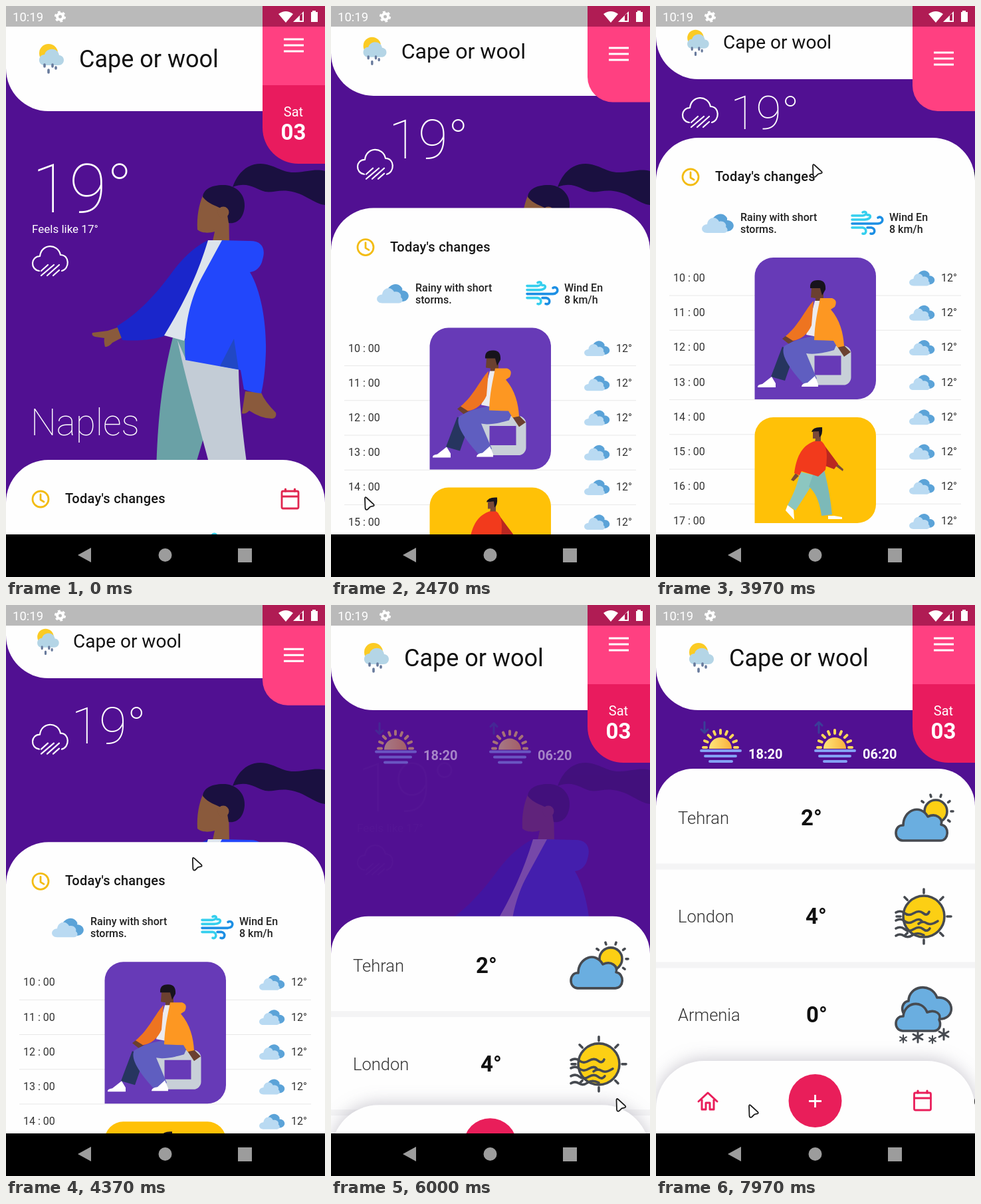
An HTML page for the animation above (8000 ms loop, 480 by 858 pixels).

```html
<!DOCTYPE html>
<html lang="en">
<head>
<meta charset="utf-8">
<title>Weather app</title>
<style>
html, body { margin: 0; width: 100%; height: 100%; overflow: hidden; background: #000; }
svg { display: block; width: 100%; height: 100%; }
text { font-family: Roboto, sans-serif; }
.paper { fill: #fefefe; }
.line { fill: none; stroke-linecap: round; stroke-linejoin: round; }
.ink { stroke: #464a50; stroke-width: 3.6; stroke-linecap: round; stroke-linejoin: round; }
#dock { filter: drop-shadow(0 -2px 13px rgba(70, 60, 90, .28)); }
</style>
</head>
<body>
<svg id="stage" viewBox="0 0 480 858">
  <defs>
    <g id="cloud">
      <path fill="#5ba3d8" d="M14 14C17 2 30-3 37 6Q39 8 38 11C47 11 51 20 45 25Q41 29 30 27Z"/>
      <path fill="#b9daf2" d="M8 30C-2 30-3 18 8 17C9 6 22 4 26 13C33 11 38 17 36 21C41 25 38 30 33 30Z"/>
    </g>
    <g id="calendar" class="line" stroke-width="2.8">
      <rect x="-12.500" y="-12" width="25" height="26" rx="2"/>
      <path d="M-12-4H12M-7-15V-12M7-15V-12" stroke-width="3.2"/>
    </g>
    <linearGradient id="sunset" x2="1"><stop stop-color="#ffe67a"/><stop offset="1" stop-color="#f9b03c"/></linearGradient>
    <g id="sun">
      <path fill="url(#sunset)" d="M-17 0A17 17 0 0 1 17 0Z"/>
      <path id="halfRays" class="line" stroke="#ffd75a" stroke-width="4"/>
      <path class="line" stroke="#84a0f4" stroke-width="4" d="M-29 3H30M-23 11H23M-16 19H17"/>
    </g>
    <path id="flake" class="ink" d="M0-8V8M-7-4L7 4M7-4L-7 4" style="stroke-width:3"/>
  </defs>

  <rect width="480" height="858" fill="#511092"/>

  <g id="woman">
    <path fill="#1a1040" d="M341 272C350 247 366 237 383 237C405 238 415 251 435 250C455 249 465 244 480 248V299C462 297 450 281 425 278C410 276 400 281 390 279C375 275 364 263 341 272Z"/>
    <path fill="#8a5a3c" d="M296 285C290 300 287 316 288 336C293 341 304 342 314 339L311 353L336 358L335 300Z"/>
    <path fill="#1a1040" d="M296 287C297 274 312 268 330 269C350 271 360 286 359 301C358 318 348 328 335 326L332 308L321 303C316 300 305 298 296 287Z"/>
    <circle cx="327" cy="310" r="8.500" fill="#8a5a3c"/>
    <path fill="#8a5a3c" d="M168 483L153 488L130 491Q128 495 134 497L148 499Q147 505 149 512Q154 513 160 506L175 498ZM360 579L384 581Q389 594 406 611Q408 619 400 620Q384 620 366 608Q360 614 355 612Z"/>
    <path fill="#6aa1a6" d="M251 498C235 560 228 620 226 700H282L300 640L270 502Z"/>
    <path fill="#c3ccd6" d="M258 502L270 530L350 545C351 600 356 640 364 700H309C288 620 270 560 258 502Z"/>
    <path fill="#1a26cb" d="M304 352C285 361 268 376 250 400C225 435 195 465 167 481L175 502C200 504 225 501 240 495C270 460 292 410 304 352Z"/>
    <path fill="#dde4ec" d="M304 352H326L300 430L268 503L238 495C262 455 285 415 304 352Z"/>
    <path fill="#2247fb" d="M325 352L365 353C386 352 391 365 386 381C384 392 376 399 367 400C385 430 392 480 391 520C390 550 387 570 384 582Q370 581 358 576L353 547L270 532C266 493 275 443 295 407C305 389 315 370 325 352Z"/>
    <path fill="#2148c4" d="M343 500L350 546L322 541Z"/>
  </g>

  <g id="hero" fill="#fff">
    <g id="temp"><text x="-6" font-size="102.500" font-weight="100">19°</text></g>
    <g id="heroExtra">
      <text x="39" y="341" font-size="17">Feels like 17°</text>
      <text x="37" y="645" font-size="54.800" font-weight="200">Naples</text>
    </g>
    <g id="rain" class="line" stroke="#fff" stroke-width="2.2">
      <path d="M50 398C36 396 37 376 51 376C53 357 78 356 82 374C96 374 96 395 84 398"/>
      <path d="M63 389L53 398M72 389L53 405M80 389L62 405M80 397L71 405"/>
    </g>
  </g>

  <g id="suns">
    <use href="#sun" x="97" y="216"/><use href="#sun" x="269" y="216"/>
    <path class="line" stroke="#3a3f98" stroke-width="3" d="M73 176V191M68 187L73 192L78 187M245 192V177M240 181L245 176L250 181"/>
    <g fill="#fff" font-size="20" font-weight="700"><text x="139" y="231">18:20</text><text x="311" y="231">06:20</text></g>
  </g>

  <g id="sheet">
    <path class="paper" d="M0 1000V262A64 64 0 0 1 64 198H416A64 64 0 0 1 480 262V1000Z"/>
    <g class="line" stroke="#f3bc13" stroke-width="2.8"><circle cx="52" cy="257" r="12"/><path d="M52 250V258L57 261"/></g>
    <text x="89" y="263" font-size="20" font-weight="500" letter-spacing=".25" fill="#161616">Today's changes</text>
    <use id="sheetCalendar" href="#calendar" x="427.500" y="257" stroke="#e0264f"/>
    <use href="#cloud" x="69" y="311"/>
    <g class="line" stroke-width="3.6">
      <path stroke="#35cfee" d="M295 315H311C319 314 317 307 311 310M295 321H314C325 320 324 313 318 314M295 333H311C318 334 317 344 311 342"/>
      <path stroke="#1c8fe4" d="M295 327H334C345 326 341 314 334 318M318 333H324C331 334 330 344 323 342"/>
    </g>
    <g font-size="16" font-weight="500" fill="#222">
      <text x="127" y="323">Rainy with short</text><text x="127" y="341">storms.</text>
      <text x="351" y="323">Wind En</text><text x="351" y="341">8 km/h</text>
    </g>
    <g id="hours"></g>

    <path fill="#673ab7" d="M148.500 591V406A28 28 0 0 1 176.500 378H303A28 28 0 0 1 331 406V563A28 28 0 0 1 303 591Z"/>
    <rect x="231" y="518" width="55" height="44" rx="4" fill="none" stroke="#c8d0d8" stroke-width="15"/>
    <path fill="#6b4030" d="M234 423L233 438L240 439V447H252V420ZM195 496L190 500L200 508L209 502ZM273 512L283 527L293 520L282 509Z"/>
    <path fill="#17131c" d="M232 424Q231 412 243 412Q256 411 255 426L250 435L247 424Z"/>
    <path fill="#26355f" d="M190 512L209 520L194 563L173 557Z"/>
    <path fill="#5f5ec0" d="M238 496L274 503L268 517Q240 525 226 522L242 560L223 569C204 548 186 525 193 511Q210 500 238 496Z"/>
    <path fill="#ecebef" d="M239 443H250L242 497L226 494Z"/>
    <path fill="#ee7420" d="M237 443C225 455 215 480 195 496L206 503Q225 500 234 480Z"/>
    <path fill="#fd9722" d="M247 439H265Q274 442 269 452L263 456C277 472 282 492 283 511L273 513L267 503L238 502C239 475 243 460 247 439Z"/>
    <path fill="#fff" d="M174 557L180 567V573H153Q152 569 160 568ZM239 556L244 568V572H219Q219 567 228 566Z"/>

    <path fill="#ffc107" d="M148.500 777V646A28 28 0 0 1 176.500 618H303A28 28 0 0 1 331 646V749A28 28 0 0 1 303 777Z"/>
    <path fill="#7b4a38" d="M236 640V650H240L239 656H248V638ZM210 702L203 712L207 714L215 706ZM270 691L281 699L282 696L272 687Z"/>
    <path fill="#17131c" d="M234 640Q236 632 250 633Q251 645 246 648L245 639Z"/>
    <path fill="#8cc6c0" d="M217 700L243 706Q225 735 210 758L198 750C208 732 213 717 217 700Z"/>
    <path fill="#7cb9b8" d="M237 702L253 697Q262 733 265 764L249 766Q245 735 230 722Z"/>
    <path fill="#ba2720" d="M251 657Q262 672 274 688L268 696L252 690Z"/>
    <path fill="#f23a1c" d="M238 654H249Q261 664 255 697L244 707L219 699L216 705L208 702C211 680 218 661 238 654Z"/>
    <path fill="#fff" d="M198 750L207 757L208 772L195 758ZM259 766H268L280 768V771H259Z"/>
  </g>

  <g id="list">
    <path class="paper" d="M0 1300V302A56 56 0 0 1 56 246H424A56 56 0 0 1 480 302V1300Z"/>
    <path stroke="#f4f4f5" stroke-width="9" d="M0 393H480M0 541H480"/>
    <g id="cities"></g>
    <path class="ink rays" data-ring="421 310 23 26 10"/>
    <circle class="ink" cx="421" cy="310" r="17" fill="#fccf14"/>
    <path class="ink" fill="#6aaee0" d="M371 354C357 353 358 330 372 331C372 308 398 298 409 318C422 312 432 321 429 330C442 332 441 354 428 354Z"/>
    <path class="ink rays" data-ring="403 468 35 41 8"/>
    <circle class="ink" cx="403" cy="468" r="31" fill="#fccf14"/>
    <path class="ink" fill="none" d="M361 462Q368 458 374 463T388 463T402 463T411 461M361 474Q368 470 374 475T388 475T400 475M395 479Q401 474 407 478T424 475M361 486Q368 482 374 487T388 487T402 487T412 486M361 497Q367 493 373 497T386 496T403 496"/>
    <path class="ink" fill="#6aaee0" d="M386 622C365 618 368 596 380 595C380 572 414 566 423 590C448 588 452 619 430 622Z"/>
    <path class="ink" fill="#6aaee0" d="M371 640C357 639 358 617 372 618C374 597 400 592 408 612C421 607 430 615 426 623C430 632 426 640 418 640Z"/>
    <use href="#flake" transform="translate(372 652)scale(.7)"/><use href="#flake" x="394" y="649"/>
    <use href="#flake" transform="translate(416 653)scale(.7)"/><use href="#flake" x="433" y="645"/>
  </g>

  <g id="dock">
    <path class="paper" d="M0 930V757A72 72 0 0 1 72 685H408A72 72 0 0 1 480 757V930Z"/>
    <ellipse cx="481" cy="746" rx="2" ry="5" fill="#222"/>
    <circle cx="239.500" cy="745" r="40" fill="#e91e5a"/>
    <path stroke="#fff" stroke-width="2.800" d="M230 745.500H249M239.500 736V755"/>
    <path class="line" stroke="#e91e5a" stroke-width="3" d="M64 746L78 733L92 746M69 743V758H75V748H81V758H87V743"/>
    <use href="#calendar" x="401" y="745" stroke="#e91e5a"/>
  </g>

  <path id="header" class="paper"/>
  <g id="badge">
    <circle cx="-4" cy="-8" r="14" fill="#fbcb24"/>
    <path fill="#b4d5e6" d="M-11 10C-21 9-20-6-10-6C-7-17 10-17 12-5C22-4 21 10 11 10Z"/>
    <path class="line" stroke="#687a9c" stroke-width="3.600" d="M-10 9V12M-4 17V21M2 9V12M7 13V15"/>
  </g>
  <g id="title"><text font-size="36" fill="#111">Cape or wool</text></g>

  <path id="dateTab" fill="#e91b5e"/>
  <g id="date" fill="#fff" text-anchor="middle">
    <text x="432.500" y="166" font-size="20">Sat</text>
    <text x="432.500" y="201" font-size="33" font-weight="700">03</text>
  </g>
  <path id="menuTab" fill="#ff4081"/>
  <path id="menu" stroke="#fff" stroke-width="3" d="M418-9H448M418 0H448M418 9H448"/>

  <path fill="#bababa" d="M0 0H386V31H0Z"/><path fill="#b01c54" d="M386 0H480V31H386Z"/>
  <g fill="#fff">
    <text x="10" y="22.500" font-size="18.500">10:19</text>
    <circle cx="81.500" cy="16" r="4.500" fill="none" stroke="#fff" stroke-width="4"/>
    <circle cx="81.500" cy="16" r="7.300" fill="none" stroke="#fff" stroke-width="2.500" stroke-dasharray="3.800 3.840"/>
    <path d="M410 12Q421 4 432 12L421 25ZM448 8V24H432ZM459 9H461V7H466V9H469V24H459Z"/>
    <path fill="#b01c54" d="M442 14L446 11V22H442Z"/>
  </g>
  <path d="M0 794H480V858H0Z"/>
  <path fill="#9c9c9c" d="M108 825L128 814V836ZM349 815H370V836H349Z"/><circle cx="239.500" cy="825" r="10" fill="#9c9c9c"/>
  <path id="cursor" fill="#fff" stroke="#1b1b1b" stroke-width="1.800" d="M1 3Q1 0 3.500 2L14 11.500Q16 14 13 14.500L9 15.500L5 19.500Q2 21 1.500 17.500Z"/>
</svg>
<script>
const LOOP = 8000;
const $ = id => document.getElementById(id);
const clamp = v => Math.max(0, Math.min(1, v));
const linear = u => u, smooth = u => u * u * (3 - 2 * u), easeOut = u => 1 - (1 - u) ** 3;

// Each step is [time, ...values].
const scrollSteps = [[1760, 0], [2080, .18], [2300, .56], [2470, .781], [2650, .93], [2900, 1], [4200, 1], [4430, .56], [4620, .13], [4730, .033], [4830, 0]];
const heroSteps = [[2020, 0], [2470, .65], [2760, 1], [4300, 1], [4680, 0]];
const headerSteps = [[2200, 0], [2470, .48], [2780, 1], [4420, 1], [4730, .23], [4830, 0]];
const listSteps = [[5880, 0], [6480, 1]];
const settleSteps = [[6480, 1.6], [6900, 0]];
const cursorSteps = [
  [30, 300, 560], [250, 434, 180], [450, 230, 114], [700, 34, 320], [850, 60, 725],
  [1030, 0, 600], [1230, 200, 148], [1400, 411, 420], [1590, 50, 737], [2700, 50, 737],
  [3300, 150, 480], [3900, 235, 237], [4150, 235, 237], [4730, 373, 673], [5150, 428, 740],
  [5900, 428, 740], [6450, 434, 749], [6750, 434, 749], [7150, 400, 420], [7550, 200, 420], [7950, 139, 750]
];

function at(steps, t, ease = linear) {
  if (t <= steps[0][0]) return steps[0].slice(1);
  for (let i = 1; i < steps.length; i++) {
    const a = steps[i - 1], b = steps[i];
    if (t <= b[0]) {
      const u = ease((t - a[0]) / (b[0] - a[0]));
      return a.slice(1).map((v, k) => v + (b[k + 1] - v) * u);
    }
  }
  return steps[steps.length - 1].slice(1);
}

function rays(cx, cy, inner, outer, count, start = 0, sweep = 2 * Math.PI) {
  return Array.from({ length: count }, (_, i) => {
    const a = start + sweep * i / count;
    const point = r => `${cx + r * Math.cos(a)} ${cy + r * Math.sin(a)}`;
    return `M${point(inner)}L${point(outer)}`;
  }).join('');
}

function build() {
  document.querySelectorAll('.rays').forEach(el => el.setAttribute('d', rays(...el.dataset.ring.split(' ').map(Number))));
  $('halfRays').setAttribute('d', rays(0, -2, 21, 26, 9, -Math.PI, Math.PI * 9 / 8));
  $('hours').innerHTML = Array.from({ length: 9 }, (_, i) => {
    const y = 408.5 + 52.2 * i;
    return `<path d="M20 ${y + 26.5}H459" stroke="#e8e8e8"/>
      <g font-size="16" fill="#333"><text x="26" y="${y + 5.5}">${10 + i} : 00</text><text x="429" y="${y + 5.5}">12°</text></g>
      <use href="#cloud" transform="translate(381 ${y - 12})scale(.8)"/>`;
  }).join('');
  $('cities').innerHTML = [['Tehran', '2°', 218], ['London', '4°', 225], ['Armenia', '0°', 226]].map(([name, degrees, x], i) =>
    `<text x="33" y="${329 + 148 * i}" font-size="25.5" font-weight="300" fill="#333">${name}</text>
     <text x="${x}" y="${331 + 148 * i}" font-size="33" font-weight="700" fill="#101010">${degrees}</text>`).join('');
}

const move = (id, x, y, scale = 1) => $(id).setAttribute('transform', `translate(${x} ${y}) scale(${scale})`);
const fade = (id, v) => $(id).setAttribute('opacity', clamp(v));
const tab = (bottom, r) => `M480 0V${bottom}H${386 + r}A${r} ${r} 0 0 1 386 ${bottom - r}V0Z`;

function draw(t) {
  const [scroll] = at(scrollSteps, t);
  const [hero] = at(heroSteps, t);
  const [head] = at(headerSteps, t);
  const [list] = at(listSteps, t, easeOut);
  const [settle] = at(settleSteps, t);

  move('sheet', 0, 484 * (1 - scroll));
  fade('sheetCalendar', 1 - 2.5 * hero);

  move('temp', 45 + 71 * hero, 310 - 125 * hero, 1 - .314 * hero);
  move('rain', 0, -223 * hero);
  fade('heroExtra', 1 - 2.5 * hero);
  fade('hero', 1 - 2 * list);
  fade('woman', 1 - 1.5 * list);

  const bottom = 158 - 48 * head;
  $('header').setAttribute('d', `M0 0H400V${bottom}H64A64 64 0 0 1 0 ${bottom - 64}Z`);
  move('badge', 68 - 5 * head, 79 - 24 * head, 1 - .12 * head);
  move('title', 110 - 9 * head, 92 - 28 * head, 1 - .222 * head);

  $('dateTab').setAttribute('d', tab(237 - 150 * hero, 54));
  fade('date', 1 - 3 * hero);
  $('menuTab').setAttribute('d', tab(119 + 39 * hero, Math.min(38, 58 * hero)));
  move('menu', 0, 59 + 20 * hero);

  move('list', 0, 436 * (1 - list));
  fade('list', 4 * list);
  move('dock', 0, 130 * (1 - list));
  fade('dock', 6 * list);
  move('suns', 0, settle);
  fade('suns', list);

  const [x, y] = at(cursorSteps, t, smooth);
  move('cursor', x, y);
  fade('cursor', t >= 30 ? 1 : 0);
}

build();
const start = performance.now();
function tick(now) {
  draw(Math.max(0, now - start) % LOOP);
  requestAnimationFrame(tick);
}
draw(0);
requestAnimationFrame(tick);
</script>
</body>
</html>
```
